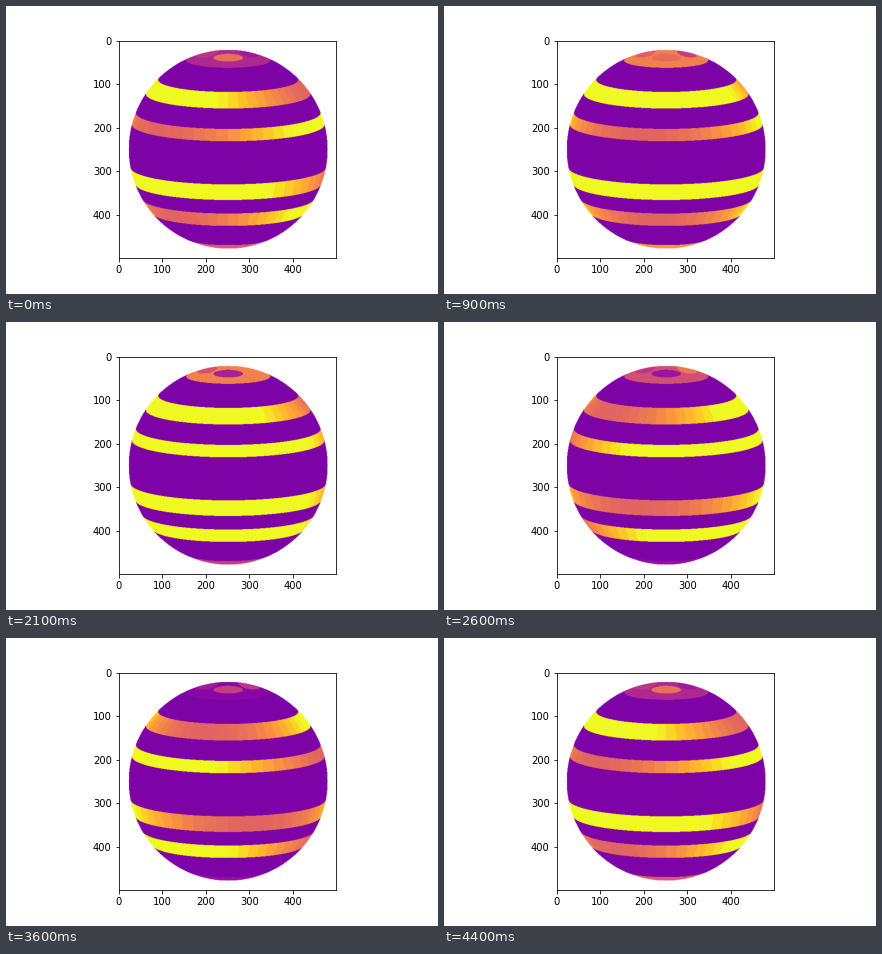
These frames come from a looping animation (432 by 288 pixels, 4.5 s). A matplotlib script:

```python
import numpy as np
import matplotlib.pyplot as plt
from matplotlib.animation import FuncAnimation

FRAMES, CYCLE = 45, 44
SIZE, RADIUS, TILT = 500, 228, np.radians(10)
BASE = 0.25
cmap = plt.get_cmap("plasma")

# Orthographic view of a globe whose north pole leans towards the viewer
row, col = np.mgrid[:SIZE, :SIZE]
x = (col - 250) / RADIUS
up = (250 - row) / RADIUS
rr = x**2 + up**2
disc = rr <= 1
depth = np.sqrt(np.clip(1 - rr, 0, None))
axis = up * np.cos(TILT) + depth * np.sin(TILT)
front = depth * np.cos(TILT) - up * np.sin(TILT)
lat = np.degrees(np.arcsin(np.clip(axis, -1, 1)))
lon = np.degrees(np.arctan2(x, front))

STEP = 7.2
cell = (np.floor(lon / STEP) + 0.5) * STEP

# south edge, north edge, longitude of the dip, turns per 11 frames
BANDS = [
    (34.2, 45.2, 82, -1),
    (14.6, 21.8, -48, 5),
    (-20.7, -10.7, 114, -1),
    (-40.5, -30.3, -40, 5),
]
# longitude, mean, swing, peak time
SPOTS = [(0, 0.50, 0.17, 4), (90, 0.52, 0.18, 22),
         (-90, 0.48, 0.13, 13), (180, 0.50, 0.15, 30)]

band_masks = [disc & (lat > s) & (lat < n) for s, n, *_ in BANDS]
north = disc & (lat > 65)
south = disc & (lat < -64.7)


def spot_mask(center):
    dlon = (lon - center + 180) % 360 - 180
    return disc & (((lat - 78) / 6) ** 2 + (dlon / 40) ** 2 < 1)


spot_masks = [spot_mask(s[0]) for s in SPOTS]


def pulse(i, mean, swing, peak):
    return mean + swing * np.cos(2 * np.pi * (i - peak) / CYCLE)


def globe(i):
    v = np.full((SIZE, SIZE), BASE)
    for mask, (_, _, dip, turns) in zip(band_masks, BANDS):
        phase = np.radians(cell[mask] - dip - 360 * turns * i / 11)
        v[mask] = 1 - 0.4 * np.clip(np.cos(phase), 0, 1)
    v[north] = pulse(i, 0.53, 0.25, 15)
    v[south] = pulse(i, 0.50, 0.25, 9)
    for mask, (_, *wave) in zip(spot_masks, SPOTS):
        v[mask] = pulse(i, *wave)
    rgb = cmap(v)[..., :3]
    rgb[~disc] = 1
    return rgb


fig, ax = plt.subplots(figsize=(6, 4), dpi=72)
fig.subplots_adjust(left=0.125, right=0.9, bottom=0.125, top=0.88)
image = ax.imshow(globe(0))


def update(i):
    image.set_data(globe(i % CYCLE))
    return [image]


anim = FuncAnimation(fig, update, frames=FRAMES, interval=100,
                     repeat=True, repeat_delay=0)
plt.show()
```
